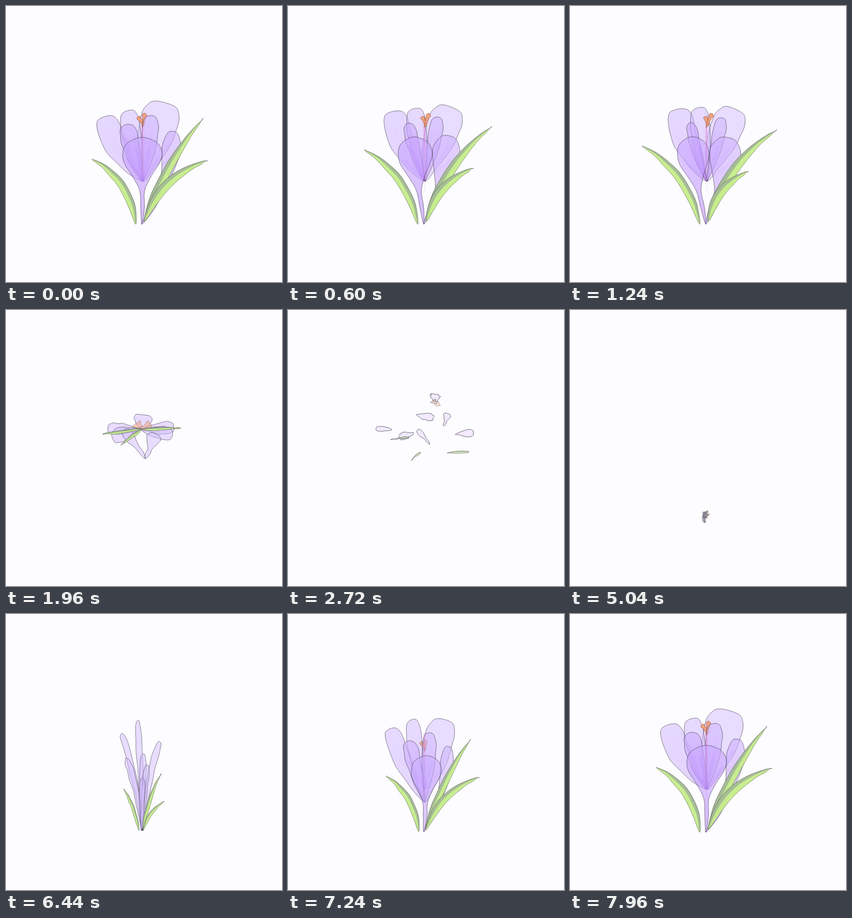
These frames come from a looping animation (480x480 px, 8000 ms). An HTML page with a canvas:

```html
<!DOCTYPE html>
<html lang="en">
<head>
<meta charset="utf-8">
<title>Crocus</title>
<style>
html, body { margin: 0; width: 100%; height: 100%; overflow: hidden; background: #fdfcff; }
canvas { display: block; width: 480px; height: 480px; }
</style>
</head>
<body>
<canvas id="stage" width="480" height="480"></canvas>
<script>
const ctx = document.getElementById('stage').getContext('2d');
const LOOP = 8000, STEP = 40;
const SIDE = 8, COUNT = SIDE * 2;
const HEART = [235, 208], ROOT = [238, 363], FOOT = [236, 377];

const lerp = (a, b, k) => a + (b - a) * k;
const smooth = k => { k = Math.min(1, Math.max(0, k)); return k * k * (3 - 2 * k); };
const mix = (p, q, k) => p.map(([x, y], i) => [lerp(x, q[i][0], k), lerp(y, q[i][1], k)]);
const scale = (p, [ox, oy], sx, sy = sx) =>
  p.map(([x, y]) => [ox + (x - ox) * sx, oy + (y - oy) * sy]);

function random(seed) {
  return () => {
    seed = (seed * 16807) % 2147483647;
    return seed / 2147483647;
  };
}

// girth(u, w): half width at height u, from root (0) to tip (1)
const kinds = {
  petal: {
    root: [238, 305], slim: 5.5,
    girth: (u, w) => w * 1.96 * u ** .9 * (1 - u) ** .3
  },
  cup: {
    root: [237, 380], slim: 5, flatRoot: [243, 259],
    girth(u, w) {
      const foot = Math.min(3.5, w) * Math.min(1, u * 8);
      const cap = Math.sqrt(1 - Math.max(0, (u - .8) / .2) ** 2);
      return (foot + (w - foot) * smooth((u - .35) / .47)) * cap;
    }
  },
  leaf: {
    root: [240, 375], slim: 3,
    girth: (u, w) => w * 3.16 * u ** .7 * (1 - u)
  },
  stamen: {
    root: [239, 211], slim: 1.5, sproutRoot: [237, 300],
    girth: (u, w) => w * (.35 + .65 * u ** 3) * Math.sqrt(1 - u ** 12)
  }
};

// bud, open: tip x, tip y, half width, bend; sprout: tip; turn: direction seen from above
const parts = [
  { kind: 'petal', tint: 0, bud: [276, 168, 33, 0], open: [287, 179, 28, -4],
    sprout: [267, 222], turn: -10, glyph: 'loop', at: [434, 240] },
  { kind: 'petal', tint: .08, bud: [172, 192, 21, -18], open: [189, 179, 23, -18],
    sprout: [201, 208], turn: 185, glyph: 'loop', at: [50, 211] },
  { kind: 'petal', tint: .05, bud: [213, 181, 17, -6], open: [225, 176, 17, -4],
    sprout: [229, 184], turn: -85, glyph: 'zig', at: [301, 43] },
  { kind: 'stamen', bud: [229, 193, 5, 4], open: [235, 192, 5, 2],
    sprout: [236, 288], turn: -110, glyph: 'zig', at: [311, 55] },
  { kind: 'stamen', bud: [242, 187, 5, -2], open: [248, 188, 5, -4],
    sprout: [239, 289], turn: -50, glyph: 'twig', at: [307, 68] },
  { kind: 'petal', tint: .25, bud: [210, 206, 15, -6], open: [209, 203, 9, -4],
    sprout: [209, 251], turn: 150, glyph: 'zig', at: [183, 233] },
  { kind: 'petal', tint: .12, bud: [252, 190, 14, 6], open: [264, 194, 11, 4],
    sprout: [239, 243], turn: 20, glyph: 'zig', at: [199, 124] },
  { kind: 'cup', tint: .2, bud: [290, 217, 16, 26], open: [275, 228, 27, 6],
    sprout: [246, 262], turn: 30, glyph: 'twig', at: [342, 100] },
  { kind: 'cup', tint: .32, bud: [237, 229, 35, 0], open: [211, 228, 28, -6],
    sprout: [237, 285], turn: 180, glyph: 'twig', at: [258, 213] },
  { kind: 'leaf', root: [225, 380], bud: [149, 266, 7, 36], open: [125, 243, 7, 38],
    sprout: [205, 304], turn: 165, glyph: 'loop', at: [155, 259] },
  { kind: 'leaf', bud: [343, 195, 7, -18], open: [360, 215, 8, -36],
    sprout: [270, 277], turn: -5, glyph: 'loop', at: [385, 353] },
  { kind: 'leaf', bud: [350, 269, 8, -36], open: [310, 288, 8, -28],
    sprout: [275, 326], turn: 120, glyph: 'loop', at: [225, 349] }
];

// Wraps a width profile around a bent spine; points run up one side and down the other.
function outline([bx, by], [tx, ty, w, bend], girth, wobble) {
  const dx = tx - bx, dy = ty - by, len = Math.hypot(dx, dy);
  const cx = (bx + tx) / 2 - dy / len * bend, cy = (by + ty) / 2 + dx / len * bend;
  return wobble.map(([jx, jy], i) => {
    const left = i <= SIDE;
    const u = Math.sin(Math.PI / 2 * (left ? i : COUNT - i) / SIDE), v = 1 - u;
    const sx = lerp(cx - bx, tx - cx, u), sy = lerp(cy - by, ty - cy, u), s = Math.hypot(sx, sy);
    const g = girth(u, w) * (left ? 1 : -1);
    return [
      v * v * bx + 2 * u * v * cx + u * u * tx + sy / s * g + jx,
      v * v * by + 2 * u * v * cy + u * u * ty - sx / s * g + jy
    ];
  });
}

const glyphs = {
  loop(i) {
    const a = 2.4 + i / COUNT * 8;
    return i ? [Math.cos(a) * 4, Math.sin(a) * 3.2] : [-5, 3];
  },
  zig: (i, r) => [(i % 2 ? 4.5 : -4.5) + r() * 3 - 1.5, (i / COUNT - .5) * 7 + r() * 2],
  twig(i, r) {
    const x = (Math.abs(i / COUNT - .5) * 2 - .5) * 9;
    return [x, -x * .4 + r() * 3 - 1.5];
  }
};

parts.forEach((p, n) => {
  const kind = kinds[p.kind], r = random(911 + n * 577);
  const jitter = size => Array.from({ length: COUNT }, () => [(r() - .5) * size, (r() - .5) * size]);
  r();
  const wobble = jitter(p.kind === 'stamen' ? 1 : 1.8);
  const shape = (root, pose) => outline(root, pose, kind.girth, wobble);
  const root = p.root || kind.root;

  const a = p.turn * Math.PI / 180, leaf = p.kind === 'leaf';
  const reach = { petal: 1, leaf: 1.2, cup: .5, stamen: .45 }[p.kind];
  const wide = leaf ? 2.5 : (9 + 7 * Math.abs(Math.sin(a))) * Math.min(1, reach * reach * 4);
  const above = [HEART[0] + 58 * reach * Math.cos(a), HEART[1] + 26 * reach * Math.sin(a), wide, 0];
  const young = kind.sproutRoot || [lerp(FOOT[0], root[0], .5), FOOT[1]];

  p.bud = shape(root, p.bud);
  p.open = shape(root, p.open);
  p.flat = shape(kind.flatRoot || HEART, above);
  p.sprout = shape(young, [...p.sprout, kind.slim, (young[0] - p.sprout[0]) * .3]);
  p.bits = wobble.map((_, i) => {
    const [x, y] = glyphs[p.glyph](i, r);
    return [p.at[0] + x, p.at[1] + y];
  });
  const cx = 232 + r() * 10, cy = 350 + r() * 22;
  p.seed = jitter(6).map(([x, y]) => [cx + x, cy + y]);
});

// look: fill, ink, bloom
const BLOOM = [1, .72, 1], FLAT = [1, .75, 0], BITS = [0, .95, 0],
      SEED = [.5, .3, 0], SPROUT = [1, .68, 0];

const keys = [
  [0, p => p.bud, BLOOM],
  [860, p => p.open, BLOOM],
  [1240, p => p.open, BLOOM],
  [1420, p => mix(p.bud, p.open, 1.08), BLOOM],
  [1680, p => scale(p.flat, HEART, 1.1), FLAT],
  [1960, p => p.flat, FLAT],
  [2520, p => scale(p.flat, HEART, .72), [.8, .8, 0]],
  [3240, p => scale(p.bits, ROOT, 1.03), BITS],
  [3600, p => p.bits, BITS],
  [4240, p => scale(p.bits, ROOT, .975), BITS, smooth],
  [5020, p => p.seed, SEED],
  [5880, p => scale(p.sprout, FOOT, .7, .6), SPROUT],
  [6440, p => p.sprout, SPROUT],
  [6720, p => mix(p.sprout, p.bud, .17), [1, .7, .15]],
  [7560, p => mix(p.bud, p.open, -.25), BLOOM],
  [LOOP, p => p.bud, BLOOM]
];

function trace(p) {
  const n = p.length;
  ctx.beginPath();
  ctx.moveTo(...p[0]);
  for (let i = 0; i < n; i++) {
    const a = p[(i + n - 1) % n], b = p[i], c = p[(i + 1) % n], d = p[(i + 2) % n];
    ctx.bezierCurveTo(
      b[0] + (c[0] - a[0]) / 6, b[1] + (c[1] - a[1]) / 6,
      c[0] - (d[0] - b[0]) / 6, c[1] - (d[1] - b[1]) / 6, c[0], c[1]);
  }
  ctx.closePath();
}

function fill(p, color) {
  trace(p);
  ctx.fillStyle = color;
  ctx.fill();
}

function ink(p, alpha, rgb = '52,46,64') {
  trace(p);
  ctx.strokeStyle = `rgba(${rgb},${alpha})`;
  ctx.lineWidth = .75;
  ctx.stroke();
}

function petal(part, p, [body, line, bloom]) {
  fill(p, `rgba(212,190,255,${.5 * body})`);
  const root = p[0], tip = p[SIDE], strength = part.tint * bloom;
  if (strength > .01) {
    const g = ctx.createLinearGradient(...tip, ...root);
    g.addColorStop(0, `rgba(186,132,255,${strength * .7})`);
    g.addColorStop(1, `rgba(178,118,252,${strength})`);
    ctx.fillStyle = g;
    ctx.fill();
    ctx.save();
    ctx.clip();
    ctx.strokeStyle = `rgba(168,100,250,${strength * .3})`;
    ctx.lineWidth = 5;
    const [x, y] = kinds.petal.root;
    for (let i = SIDE - 3; i <= SIDE + 3; i += 2) {
      ctx.beginPath();
      ctx.moveTo(x, y);
      ctx.lineTo(lerp(x, p[i][0], .8), lerp(y, p[i][1], .8));
      ctx.stroke();
    }
    ctx.restore();
  }
  ink(p, line);
}

function cup(part, p, look) {
  petal(part, p, look);
  const [x, y] = p[0], g = ctx.createLinearGradient(0, y - 170, 0, y - 50);
  g.addColorStop(0, `rgba(222,120,200,${.28 * look[2]})`);
  g.addColorStop(1, 'rgba(222,120,210,0)');
  ctx.fillStyle = g;
  ctx.fillRect(x - .5, y - 170, 3, 120);
}

function leaf(part, p, [body, line]) {
  fill(p, `rgba(198,238,138,${.95 * body})`);
  // the upper side lies in shade
  const q = p[SIDE][0] < p[0][0] ? [p[0], ...p.slice(1).reverse()] : p;
  const inner = q.slice(SIDE + 1).map((b, i) => {
    const a = q[SIDE - 1 - i];
    return [lerp(a[0], b[0], .42), lerp(a[1], b[1], .42)];
  });
  fill([...q.slice(0, SIDE + 1), ...inner], `rgba(160,180,152,${.85 * body})`);
  ink(p, line * .85);
}

function stamen(part, p, [body, line, bloom]) {
  fill(p, `rgba(240,160,122,${body * lerp(.5, .95, bloom)})`);
  ink(p, line * .6);
  ink(p, .6 * bloom, '205,88,58');
}

const painters = { petal, cup, leaf, stamen };

function draw(t) {
  const i = keys.findIndex((key, n) => t < keys[n + 1][0]);
  const [t0, from, lookA, ease = k => k] = keys[i], [t1, to, lookB] = keys[i + 1];
  const k = ease((t - t0) / (t1 - t0));
  const look = lookA.map((v, j) => lerp(v, lookB[j], k));

  ctx.fillStyle = '#fdfcff';
  ctx.fillRect(0, 0, 480, 480);
  ctx.lineJoin = 'round';
  for (const part of parts) painters[part.kind](part, mix(from(part), to(part), k), look);
}

const start = performance.now();
function tick() {
  const t = (performance.now() - start) % LOOP;
  draw(Math.floor(t / STEP) * STEP);
  requestAnimationFrame(tick);
}
tick();
</script>
</body>
</html>
```
